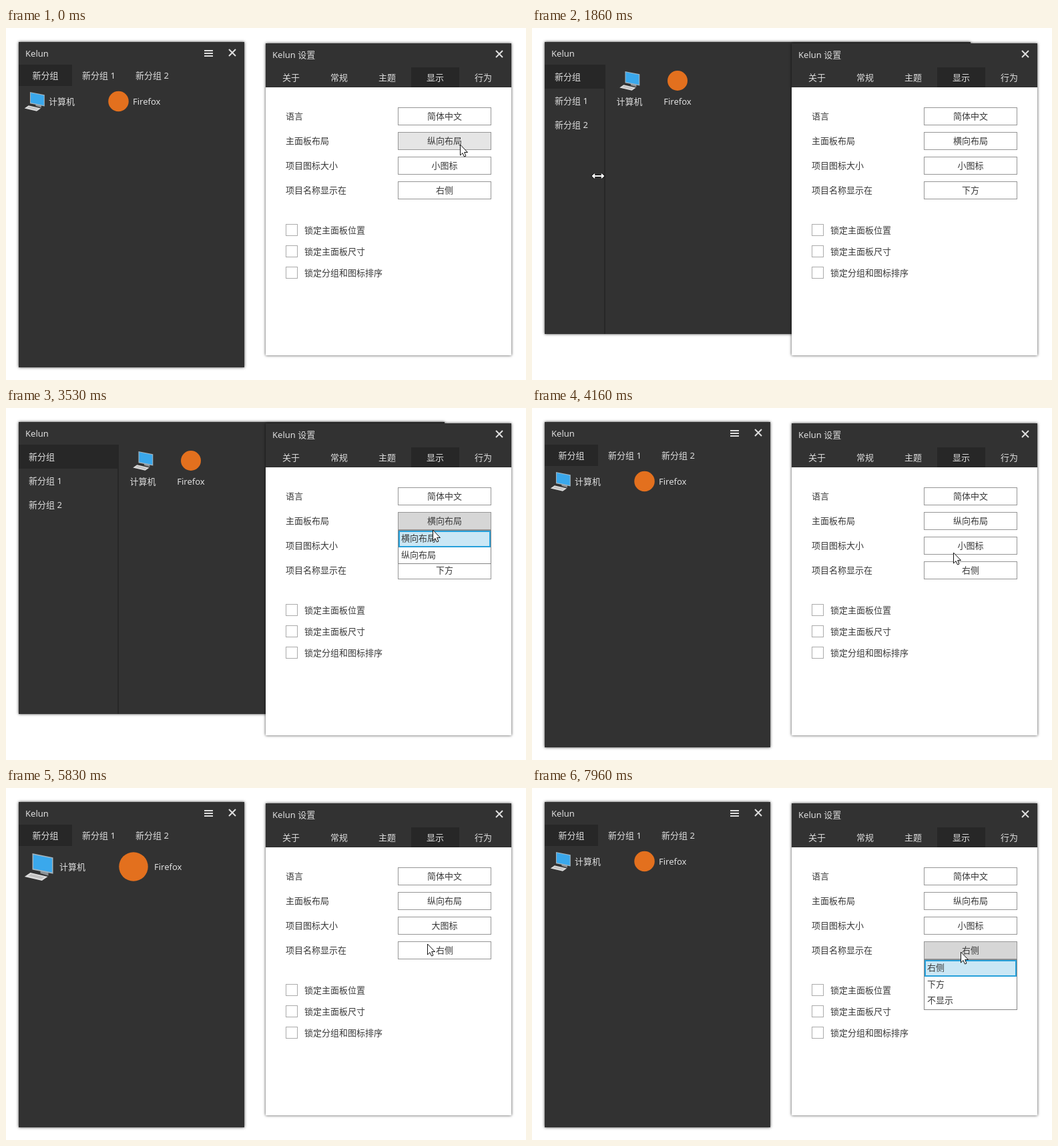
Write an HTML page with a canvas that moves like this. It is 779 px wide and 528 px high and loops after 8 s.

```html
<!DOCTYPE html>
<html lang="zh-CN">
<head>
<meta charset="utf-8">
<title>Kelun 设置</title>
<style>
html, body { margin: 0; width: 100%; height: 100%; overflow: hidden; background: #fff; }
canvas { display: block; }
</style>
</head>
<body>
<canvas id="stage" width="779" height="528"></canvas>
<script>
const ctx = document.getElementById('stage').getContext('2d');
const LOOP = 8000, SLIDE = 125, ITEM = 24.5;
const DARK = '#323232', DARKER = '#272727', LIGHT = '#dedede', INK = '#383838', EDGE = '#969696';
const BUTTON = { x: 587, w: 140, h: 27 };

const GROUPS = ['新分组', '新分组 1', '新分组 2'];
const TABS = ['关于', '常规', '主题', '显示', '行为'];
const LOCKS = ['锁定主面板位置', '锁定主面板尺寸', '锁定分组和图标排序'];
const ROWS = [
  { label: '语言', items: ['简体中文'], first: 0 },
  { label: '主面板布局', items: ['横向布局', '纵向布局'], first: 1 },
  { label: '项目图标大小', items: ['大图标', '小图标'], first: 1 },
  { label: '项目名称显示在', items: ['右侧', '下方', '不显示'], first: 0 }
];

// Visits to the drop-downs: the pointer heads for the button at `reach`,
// for the chosen item `to` at `pick`, and the choice takes effect at `close`.
const VISITS = [
  { row: 1, to: 0, open: 50, pick: 360, close: 790 },
  { row: 1, to: 1, reach: 2480, open: 3200, pick: 3460, close: 4160 },
  { row: 2, to: 0, reach: 4510, open: 4825, pick: 5150, close: 5830 },
  { row: 2, to: 1, reach: 6330, open: 6640, pick: 6880, close: 7350 },
  { row: 3, to: 0, reach: 7540, open: 7835, close: LOOP }
];
const DRAG = { start: 1710, back: 2100, end: 2480, from: 158, to: 168, min: 109 };

const rowTop = row => 119 + 37 * row;
const listTop = row => rowTop(row) + BUTTON.h;

const GLIDES = [
  { start: 1000, x: DRAG.from, y: 222 },
  { start: DRAG.start, x: 70, y: 222 },
  { start: DRAG.back, x: DRAG.to, y: 222 },
  ...VISITS.flatMap(v => [
    { start: v.reach, x: 642, y: rowTop(v.row) + 16 },
    { start: v.pick, x: 631, y: listTop(v.row) + 14 + 20 * v.to }
  ])
].filter(g => g.start).sort((a, b) => a.start - b.start);

// Every glide eases in and out; longer ways take longer.
function pointerAt(t) {
  const at = { x: 680, y: 175 };
  for (const g of GLIDES) {
    if (t < g.start) break;
    const dx = g.x - at.x, dy = g.y - at.y;
    const p = Math.min(1, (t - g.start) / (200 + Math.hypot(dx, dy) / 2));
    const e = p * p * (3 - 2 * p);
    at.x += dx * e;
    at.y += dy * e;
  }
  return at;
}

function choice(row, t) {
  const past = VISITS.filter(v => v.row === row && v.close <= t).pop();
  return past ? past.to : ROWS[row].first;
}

function rect(x, y, w, h, color) {
  ctx.fillStyle = color;
  ctx.fillRect(x, y, w, h);
}

function box(x, y, w, h, edge, fill, width = 1) {
  rect(x, y, w, h, edge);
  rect(x + width, y + width, w - 2 * width, h - 2 * width, fill);
}

function text(str, x, middle, color, align = 'left') {
  ctx.font = '13px "Noto Sans", "Noto Sans CJK SC", "Noto Sans CJK", sans-serif';
  ctx.textAlign = align;
  ctx.fillStyle = color;
  ctx.fillText(str, x, middle + 5);
}

function panel(x, y, w, h, color) {
  ctx.save();
  ctx.shadowColor = 'rgba(0,0,0,.75)';
  ctx.shadowBlur = 4;
  rect(x, y, w, h, color);
  ctx.restore();
}

function stroke(path, color, width) {
  ctx.strokeStyle = color;
  ctx.lineWidth = width;
  ctx.stroke(new Path2D(path));
}

function closeMark(x, y) {
  ctx.save();
  ctx.translate(x, y);
  stroke('M-5-5L5 5M5-5L-5 5', LIGHT, 2);
  ctx.restore();
}

function slab(x, y, w, h, slope, lean, color) {
  ctx.save();
  ctx.transform(1, slope, lean, 1, x, y);
  rect(0, 0, w, h, color);
  ctx.restore();
}

function computer(x, y, size) {
  ctx.save();
  ctx.translate(x, y);
  ctx.scale(size / 44, size / 44);
  slab(2, 4, 12, 6, 0.3, 0, '#8d9296');
  slab(-10, -20, 31, 24.5, 0.2, 0, '#a3b4be');
  slab(-8.5, -18, 28, 21, 0.2, 0, '#3aa8ec');
  slab(-13, 9, 26, 6, 0.23, -1.45, '#dedede');
  slab(-12, 11, 20, 3, 0.23, -1.45, '#c2c2c2');
  ctx.restore();
}

function browser(x, y, size) {
  ctx.fillStyle = '#e3701e';
  ctx.beginPath();
  ctx.arc(x, y, size / 2, 0, 2 * Math.PI);
  ctx.fill();
}

function wideLauncher(divider) {
  panel(19, 21, 638, 438, DARK);
  rect(19, 55, divider - 20, 36, DARKER);
  rect(divider - 1, 55, 2, 404, DARKER);
  GROUPS.forEach((name, i) => text(name, 34, 73 + 36 * i, LIGHT));
  computer(divider + 37.5, 79, 31);
  browser(divider + 109, 79, 30);
  text('计算机', divider + 37, 110, LIGHT, 'center');
  text('Firefox', divider + 109, 110, LIGHT, 'center');
}

function tallLauncher(large) {
  const size = large ? 44 : 31, middle = large ? 118 : 110, cell = large ? 142 : 126;
  const labelX = size + (large ? 36 : 33);
  panel(19, 21, 338, 488, DARK);
  rect(19, 55, 80, 32, DARKER);
  GROUPS.forEach((name, i) => text(name, 59 + 80 * i, 71, LIGHT, 'center'));
  for (let i = 0; i < 3; i++) rect(297, 33 + 4 * i, 13, 2, LIGHT);
  closeMark(339, 37);
  computer(27.5 + size / 2, middle, size);
  browser(27 + size / 2 + cell, middle, size - 0.5);
  text('计算机', labelX, middle, LIGHT);
  text('Firefox', labelX + cell, middle, LIGHT);
}

function settings(values, fills) {
  panel(389, 23, 368, 468, '#fff');
  rect(389, 23, 368, 66, DARK);
  rect(607, 59, 72, 30, DARKER);
  text('Kelun 设置', 399, 40, LIGHT);
  closeMark(739, 39);
  TABS.forEach((name, i) => text(name, 427 + 72 * i, 74, LIGHT, 'center'));
  ROWS.forEach(({ label }, i) => {
    const y = rowTop(i);
    text(label, 419, y + 13, INK);
    box(BUTTON.x, y, BUTTON.w, BUTTON.h, EDGE, fills[i]);
    text(values[i], 657, y + 13, INK, 'center');
  });
  LOCKS.forEach((name, i) => {
    box(419, 294 + 32 * i, 18, 18, '#ababab', '#fff');
    text(name, 447, 303 + 32 * i, INK);
  });
}

function dropDown(visit, t, mouse) {
  const { items } = ROWS[visit.row], top = listTop(visit.row);
  const height = Math.ceil(items.length * ITEM + 2);
  const shown = Math.round(height * Math.min(1, (t - visit.open) / SLIDE));
  const hovered = Math.floor((mouse.y - top) / ITEM);
  const active = items[hovered] ? hovered : choice(visit.row, t);
  ctx.save();
  ctx.beginPath();
  ctx.rect(BUTTON.x, top, BUTTON.w, shown);
  ctx.clip();
  ctx.translate(BUTTON.x, top + shown - height);
  box(0, 0, BUTTON.w, height, '#868686', '#fff');
  box(1, 1 + Math.floor(active * ITEM), 138, 25, '#26a0da', '#cae7f5', 2);
  items.forEach((name, i) => text(name, 5, Math.floor(12.5 + ITEM * i), INK));
  ctx.restore();
}

function pointer(mouse, resizing) {
  ctx.save();
  ctx.translate(Math.round(mouse.x), Math.round(mouse.y));
  if (resizing) {
    const arrows = 'M-8 0H8M-5-3L-8 0-5 3M5-3L8 0 5 3';
    stroke(arrows, '#111', 4);
    stroke(arrows, '#fff', 2);
  } else {
    const arrow = 'M.5 0V16L4 12.6 6.5 18 9 17 6.7 11.5H11.5Z';
    ctx.fillStyle = '#fff';
    ctx.fill(new Path2D(arrow));
    stroke(arrow, '#111', 1);
  }
  ctx.restore();
}

function dividerAt(t, mouse) {
  if (t < DRAG.start) return DRAG.from;
  return t < DRAG.end ? Math.max(DRAG.min, Math.round(mouse.x)) : DRAG.to;
}

function draw(t) {
  const mouse = pointerAt(t);
  const visit = VISITS.find(v => t >= v.open && t < v.close);
  const settled = !VISITS.some(v => t >= v.close && t < v.close + 60);
  const wide = choice(1, t) === 0, large = choice(2, t) === 0;
  const divider = dividerAt(t, mouse);
  const dragging = t >= DRAG.start && t < DRAG.end;

  const fills = ROWS.map((_, row) => {
    if (visit) return visit.row === row ? '#d6d6d6' : '#fff';
    const dx = mouse.x - BUTTON.x, dy = mouse.y - rowTop(row);
    const inside = dx >= 0 && dx < BUTTON.w && dy >= 0 && dy < BUTTON.h;
    return inside && settled ? '#e5e5e5' : '#fff';
  });
  const values = ROWS.map(({ items }, row) => items[row === 3 && wide ? 1 : choice(row, t)]);

  rect(0, 0, 779, 528, '#fff');
  if (wide) wideLauncher(divider);
  else tallLauncher(large);
  text('Kelun', 29, 38, LIGHT);
  settings(values, fills);
  if (visit) dropDown(visit, t, mouse);
  pointer(mouse, dragging || (wide && Math.abs(mouse.x - divider) < 3));
}

function tick() {
  draw(performance.now() % LOOP);
  requestAnimationFrame(tick);
}
tick();
</script>
</body>
</html>
```
